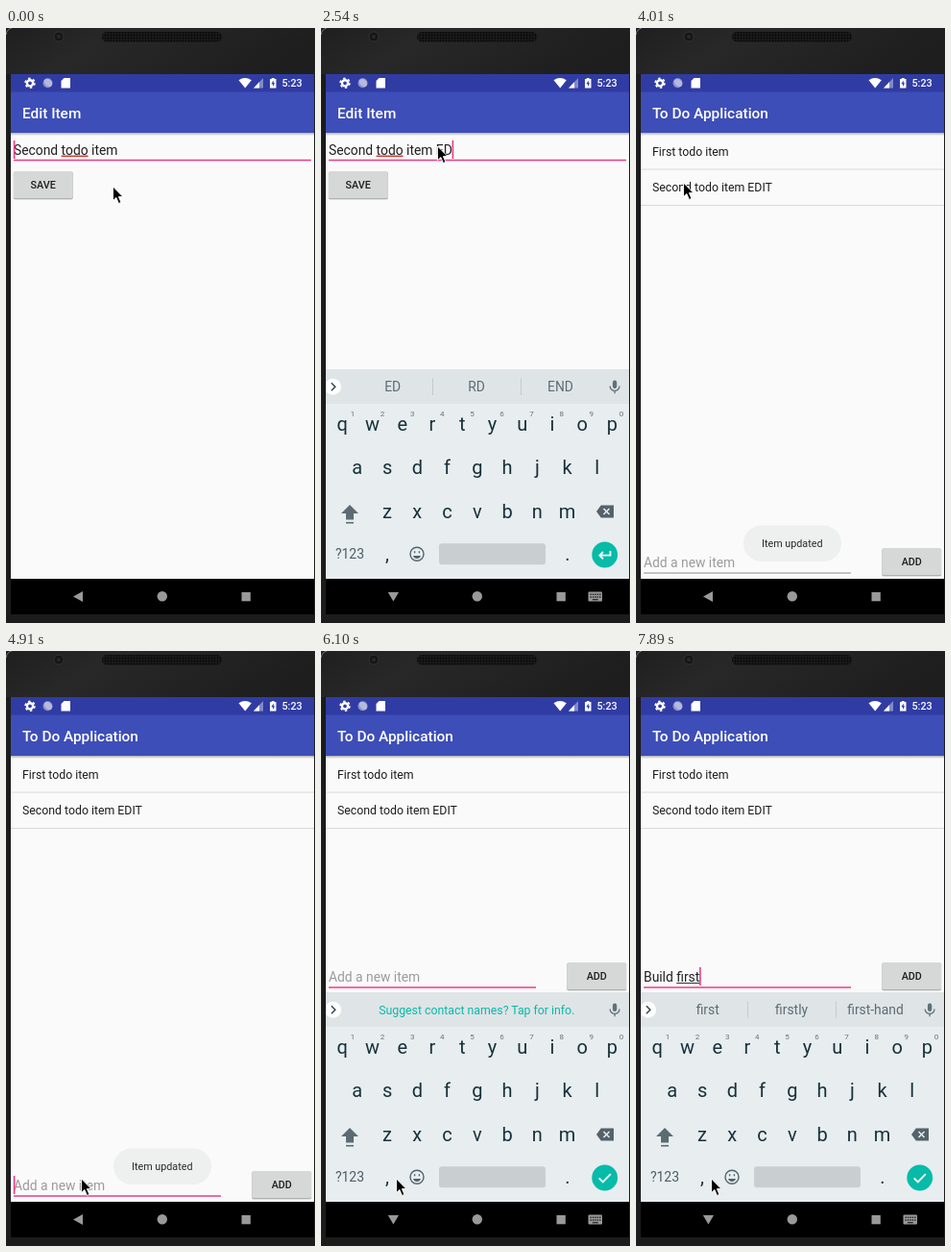
These frames come from a looping animation (322x619 px, 8000 ms). An HTML page:

```html
<!DOCTYPE html>
<html lang="en">
<head>
<meta charset="utf-8">
<title>To Do Application</title>
<style>
html, body { margin: 0; width: 100%; height: 100%; overflow: hidden; background: #1d1d1d; }
svg { display: block; width: 322px; height: 619px; }
text { font-family: Roboto, "Noto Sans", sans-serif; white-space: pre; }
.mid { text-anchor: middle; }
.input { font-size: 13.85px; fill: #212121; }
.hint { font-size: 13.85px; fill: #9b9b9b; }
.item { font-size: 12.3px; fill: #1c1c1c; }
.title { font-size: 15.4px; font-weight: 500; fill: #fff; }
.btn { font-size: 10.77px; font-weight: 500; fill: #1e1e1e; }
.key { font-size: 20px; fill: #17323a; }
.num { font-size: 8px; fill: #64757c; }
.sug { font-size: 13.85px; fill: #5d6c73; }
.tip { font-size: 12.3px; fill: #08b9a6; }
</style>
</head>
<body>
<svg viewBox="0 0 322 619">
  <defs>
    <linearGradient id="bezel" x2="1" y2=".25">
      <stop offset="0" stop-color="#1f1f1f"/><stop offset=".35" stop-color="#282828"/><stop offset="1" stop-color="#1e1e1e"/>
    </linearGradient>
    <linearGradient id="shade" x2="0" y2="1">
      <stop stop-color="#000" stop-opacity=".3"/><stop offset="1" stop-color="#000" stop-opacity="0"/>
    </linearGradient>
    <pattern id="mesh" width="3" height="3" patternUnits="userSpaceOnUse">
      <rect width="3" height="3" fill="#1a1a1a"/><circle cx="1.5" cy="1.5" r=".9" fill="#060606"/>
    </pattern>
    <clipPath id="screen"><rect x="5" y="48" width="316" height="562"/></clipPath>
  </defs>

  <rect width="322" height="619" fill="#1c1c1c"/>
  <rect width="322" height="48" fill="url(#bezel)"/>
  <path d="M0 7Q1 1 6 0" fill="none" stroke="#777" stroke-width="1"/>
  <circle cx="55" cy="9" r="5" fill="#151515" stroke="#343434"/>
  <circle cx="55" cy="9" r="2" fill="#262a30"/>
  <rect x="100" y="4" width="125" height="10.5" rx="5" fill="url(#mesh)"/>

  <g clip-path="url(#screen)">
    <rect x="5" y="48" width="316" height="562" fill="#fafafa"/>
    <rect x="5" y="66" width="316" height="43" fill="#3d4eb8"/>
    <rect x="5" y="109" width="316" height="3" fill="url(#shade)"/>
    <rect x="5" y="48" width="316" height="18.5" fill="#303ca3"/>
    <g fill="#fff">
      <circle cx="25" cy="57.3" r="3.1" fill="none" stroke="#fff" stroke-width="2.4"/>
      <circle cx="25" cy="57.3" r="4.9" fill="none" stroke="#fff" stroke-width="1.6" stroke-dasharray="2.5 2.63"/>
      <circle cx="43.5" cy="57.3" r="5" opacity=".45"/>
      <path d="M40 54a5 5 0 0 1 7 7a6 6 0 0 1 -7 -7Z" opacity=".35"/>
      <path d="M60.5 52H67V62.5H57.5V55Z"/>
      <path d="M242.5 54.3Q249 49.6 255.8 54.3L249.2 62.5Z"/>
      <path d="M268 52V62.5H258Z" opacity=".4"/>
      <path d="M264 56.2V62.5H258Z"/>
      <path d="M276.8 52H279.6V53H281.5V62.5H275V53H276.8Z"/>
    </g>
    <path d="M278.8 54.5L276.4 58.3H278V61L280.2 57.2H278.8Z" fill="#303ca3"/>
    <text x="287.5" y="61.3" class="btn" style="fill:#fff">5:23</text>
    <text id="title" x="17" y="94" class="title"></text>

    <g id="edit">
      <path id="redline" stroke="#e0332c" stroke-width="1.5"/>
      <path d="M8 137.5H318" stroke="#ee3a83" stroke-width="1.6"/>
      <text id="editText" x="8" y="132" class="input"></text>
      <path id="itemLine" stroke="#333" stroke-width="1"/>
      <path id="handle" d="M0 138L5.6 143.4A7.4 7.4 0 1 1 -5.6 143.4Z" fill="#ee3a83"/>
      <g id="save"></g>
    </g>

    <g id="list">
      <text x="17" y="132.6" class="item">First todo item</text>
      <text x="17" y="170.4" class="item">Second todo item EDIT</text>
      <path d="M5 147H321M5 184.5H321" stroke="#dadada"/>
      <g id="entry">
        <path id="entryLine" d="M8 567H224"/>
        <text id="entryText" x="8" y="561"></text>
        <path id="wordLine" stroke="#333" stroke-width="1"/>
        <g id="add"></g>
      </g>
    </g>
    <rect id="caret" width="1.6" height="19" fill="#ee3a83"/>

    <rect x="5" y="573" width="316" height="37" fill="#000"/>
    <g id="kb">
      <rect x="5" y="355" width="316" height="218" fill="#e8edf0"/>
      <rect x="5" y="355" width="316" height="36" fill="#dfe4e7"/>
      <path d="M116.5 364.5V382M208.5 364.5V382" id="seps" stroke="#c3cacd"/>
      <circle cx="12.5" cy="373.3" r="8.5" fill="#fff"/>
      <path d="M10.8 369.3L14.8 373.3L10.8 377.3" fill="none" stroke="#37474f" stroke-width="1.5"/>
      <rect x="303.9" y="366.5" width="4.4" height="8.5" rx="2.2" fill="#607078"/>
      <path d="M301.2 372.5a4.9 4.9 0 0 0 9.8 0M306.1 377.5V380.3" fill="none" stroke="#607078" stroke-width="1.3"/>
      <g id="sugs"></g>
      <g id="keys"></g>
      <path d="M30 496L39 505H34V511.5H26V505H21Z" fill="#5b6b72"/>
      <path d="M26 514.7H34" stroke="#5b6b72" stroke-width="1.6"/>
      <path d="M287 503L291.8 496.5H305V509.5H291.8Z" fill="#546269"/>
      <path d="M294.5 500L300.5 506M300.5 500L294.5 506" stroke="#e8edf0" stroke-width="1.5"/>
      <text x="30" y="552.3" class="mid" style="font-size:14px;fill:#4b5d65">?123</text>
      <g fill="none" stroke="#52636b" stroke-width="1.4">
        <circle cx="100" cy="547.3" r="7"/><path d="M96 549a4.2 4.2 0 0 0 8 0Z" fill="#52636b" stroke="none"/>
        <path d="M97.6 544.3V546.2M102.4 544.3V546.2"/>
      </g>
      <rect x="123" y="536.3" width="111" height="22" rx="3" fill="#c9ced1"/>
      <circle cx="295.7" cy="548" r="13.4" fill="#06bba8"/>
      <path id="action" fill="none" stroke="#fff" stroke-width="1.8"/>
    </g>
    <g id="nav">
      <path id="back"/>
      <circle cx="162.8" cy="591.3" r="5.2"/>
      <rect x="245.5" y="587" width="9.3" height="9.3"/>
      <g id="kbIcon">
        <rect x="278.5" y="586.5" width="14.5" height="10" rx="1"/>
        <path d="M280.5 589.3H291.5M280.5 592H291.5" stroke="#222" stroke-width="1.4" stroke-dasharray="1.4 1"/>
        <path d="M282.8 594.7H288.8" stroke="#222" stroke-width="1.2"/>
      </g>
    </g>
    <g id="toast">
      <rect x="112" y="517.5" width="102" height="37.5" rx="18.7" fill="#eeefef"/>
      <text x="162.8" y="540.3" class="mid" style="font-size:10.77px;fill:#2a2a2a">Item updated</text>
    </g>
  </g>
  <path id="mouse" d="M0 0V14.6L3.4 11.5L5.9 17.5L8.4 16.4L5.9 10.6H10.4Z" fill="#000" stroke="#fff" stroke-width=".9"/>
</svg>
<script>
const LOOP = 8000;
const $ = id => document.getElementById(id);
const pen = document.createElement('canvas').getContext('2d');
const BASE = 'Second todo item';

// Each row: start time in ms, then the values held from there on.
const mouseSteps = [
  [0, 111.5, 165], [150, 118, 142], [300, 121.5, 123], [2980, 114, 129], [3130, 92, 142],
  [3280, 64, 156], [3420, 49.5, 161], [4160, 52, 200], [4310, 62, 340], [4460, 72, 470],
  [4610, 77, 535], [4760, 78.5, 549]
];
const typed = [
  [0, BASE], [1500, BASE + ' '], [2090, BASE + ' E'], [2540, BASE + ' ED'],
  [2690, BASE + ' EDI'], [2840, BASE + ' EDIT'], [3860, ''], [6400, 'B'], [6700, 'Bui'],
  [6850, 'Buil'], [7000, 'Build'], [7300, 'Build '], [7450, 'Build f'], [7600, 'Build fi'],
  [7750, 'Build firs'], [7890, 'Build first']
];
const hints = [
  [0, 'item|items|its'], [2090, 'E|Re|Est'], [2540, 'ED|RD|END'], [2690, 'EDI|EDIT|EDIE'],
  [2840, 'EDIT|EDITING|EDITED'], [3860, 'Suggest contact names? Tap for info.'],
  [6700, 'Bui|Built|Building'], [6850, 'Buil|Build|Building'], [7000, 'Build|Building|Builds'],
  [7300, 'a|the|up'], [7450, 'for|from|first'], [7600, 'fi|first|find'],
  [7750, 'first|firs|first-hand'], [7890, 'first|firstly|first-hand']
];
const kbSteps = [
  [0, 0, 0], [750, 8, .8], [900, 0, 1], [3710, 8, .8], [3860, 0, 0],
  [5210, 36, .12], [5360, 33, .6], [5510, 0, 1]
];
const toastSteps = [
  [0, 0], [3710, .1], [3860, .7], [4010, 1], [5360, .92], [5510, .14], [5810, .05], [5960, 0]
];
const caretSteps = [
  [0, 1], [300, 0], [750, 1], [1790, 0], [2090, 1], [3860, 0], [4910, 1], [6100, 0], [6400, 1]
];

const at = (steps, t) => steps.findLast(s => s[0] <= t).slice(1);
const set = (id, attrs) => { for (const k in attrs) $(id).setAttribute(k, attrs[k]); };
const show = (id, on) => { $(id).style.display = on ? '' : 'none'; };
const label = (s, x, y, cls) => `<text x="${x}" y="${y}" class="mid ${cls}">${s}</text>`;

function put(id, s) {
  if ($(id).textContent !== s) $(id).textContent = s;
}

function width(s) {
  pen.font = '13.85px Roboto, "Noto Sans", sans-serif';
  return pen.measureText(s).width;
}

function button(id, x, y, w, name) {
  $(id).innerHTML =
    `<rect x="${x - .6}" y="${y + .4}" width="${w + 1.2}" height="29" rx="2" fill="#000" opacity=".1"/>
     <rect x="${x}" y="${y + .8}" width="${w}" height="28.4" rx="1.5" fill="#000" opacity=".22"/>
     <rect class="face" x="${x}" y="${y}" width="${w}" height="28" rx="1.5" fill="#d6d7d7"/>`
    + label(name, x + w / 2, y + 17.8, 'btn');
}

function keyRow(chars, x, y) {
  return [...chars].map((c, i) => label(c, x + i * 31.25, y, 'key')).join('');
}

button('save', 8, 149, 61.5, 'SAVE');
button('add', 256.5, 541, 61.5, 'ADD');
$('keys').innerHTML = keyRow('qwertyuiop', 22.2, 419) + keyRow('asdfghjkl', 37.8, 464.3)
  + keyRow('zxcvbnm', 69, 509.8) + label(',', 69, 554, 'key') + label('.', 257, 554, 'key')
  + [...'1234567890'].map((c, i) => label(c, 33 + i * 31.1, 403.5, 'num')).join('');

let lastHint = '';
function drawHints(s) {
  if (s === lastHint) return;
  lastHint = s;
  const words = s.split('|');
  show('seps', words.length > 1);
  $('sugs').innerHTML = words.length > 1
    ? words.map((w, i) => label(w, 74.7 + i * 87.4, 378.4, 'sug')).join('')
    : label(s, 162.3, 378, 'tip');
}

function underline(id, from, to, y) {
  set(id, { d: `M${8 + from} ${y}H${8 + to}` });
}

function draw(t) {
  const editing = t < 3860;
  const [text] = at(typed, t);
  const [dy, alpha] = at(kbSteps, t);
  const kbOpen = (t >= 750 && t < 3710) || t >= 5210;
  const raised = t >= 5210 ? -217 : 0;
  const focused = t >= 4910;

  put('title', editing ? 'Edit Item' : 'To Do Application');
  show('edit', editing);
  show('list', !editing);

  if (editing) {
    put('editText', text);
    underline('redline', width('Second '), width('Second todo'), 133.3);
    underline('itemLine', width('Second todo '), width(BASE), 133.8);
    show('itemLine', t >= 750 && t < 1350);
    show('handle', t >= 750 && t < 1350);
    set('handle', { transform: `translate(${8 + width(BASE)} 0)` });
    document.querySelector('#save .face').setAttribute('fill', t >= 3560 ? '#bfc3c3' : '#d6d7d7');
  } else {
    set('entry', { transform: `translate(0 ${raised})` });
    put('entryText', text || 'Add a new item');
    set('entryText', { class: text ? 'input' : 'hint' });
    set('entryLine', { stroke: focused ? '#ee3a83' : '#8b8b8b', 'stroke-width': focused ? 1.7 : 1 });
    const start = text.lastIndexOf(' ') + 1;
    underline('wordLine', width(text.slice(0, start)), width(text), 562.5);
  }

  const caretX = editing && t < 750 ? 0 : width(text);
  set('caret', { x: 7.8 + caretX, y: editing ? 117 : 546 + raised });
  show('caret', at(caretSteps, t)[0]);

  set('kb', { transform: `translate(0 ${dy})`, opacity: alpha });
  show('kb', alpha > 0);
  drawHints(at(hints, t)[0]);
  set('action', {
    d: editing ? 'M301.5 544V548.7H290.5M294 545L290.3 548.7L294 552.4' : 'M289.7 548.3L293.8 552.4L301.8 544.2'
  });

  set('nav', { fill: dy > 20 && alpha > .3 ? '#d0d2d2' : '#999' });
  set('back', { d: kbOpen ? 'M69.8 587H81L75.4 596.5Z' : 'M80 586V597L70 591.5Z' });
  show('kbIcon', kbOpen);
  set('toast', { opacity: at(toastSteps, t)[0] });
  set('mouse', { transform: `translate(${at(mouseSteps, t).join(' ')})` });
}

const began = performance.now();
function frame() {
  draw((performance.now() - began) % LOOP);
  requestAnimationFrame(frame);
}
frame();
</script>
</body>
</html>
```
